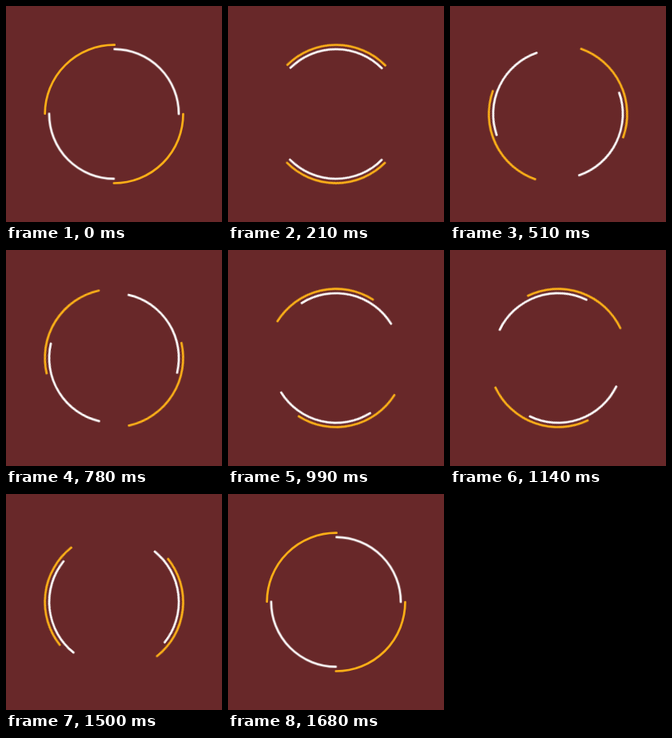
These frames come from a looping animation (270x270 px, 1.71 s). An HTML page:

```html
<!DOCTYPE html>
<html lang="en">
<head>
<meta charset="utf-8">
<title>Double ring spinner</title>
<style>
  html, body { margin: 0; width: 100%; height: 100%; overflow: hidden; background: #682829; }
  svg { display: block; width: 100vw; height: 100vh; }
  circle { fill: none; stroke-width: 1; stroke-linecap: round; transform-origin: 50px 50px; }
</style>
</head>
<body>
<svg viewBox="0 0 100 100">
  <circle id="outer" cx="50" cy="50" r="32" stroke="#ffb217"/>
  <circle id="inner" cx="50" cy="50" r="30" stroke="#fff"/>
</svg>
<script>
  const STEP = 30, COUNT = 57;

  // Two opposite quarter arcs; the first and last steps share one pose.
  function spin(id, turn, shift) {
    const ring = document.getElementById(id);
    const quarter = ring.r.baseVal.value * Math.PI / 2;
    ring.style.strokeDasharray = `${quarter} ${quarter}`;
    ring.style.strokeDashoffset = quarter * shift;
    ring.animate(
      { transform: ['rotate(0deg)', `rotate(${turn}deg)`] },
      { duration: STEP * COUNT, iterations: Infinity, easing: `steps(${COUNT}, jump-none)` }
    );
  }

  spin('outer', 360, 0);
  spin('inner', -360, 1);
</script>
</body>
</html>
```
